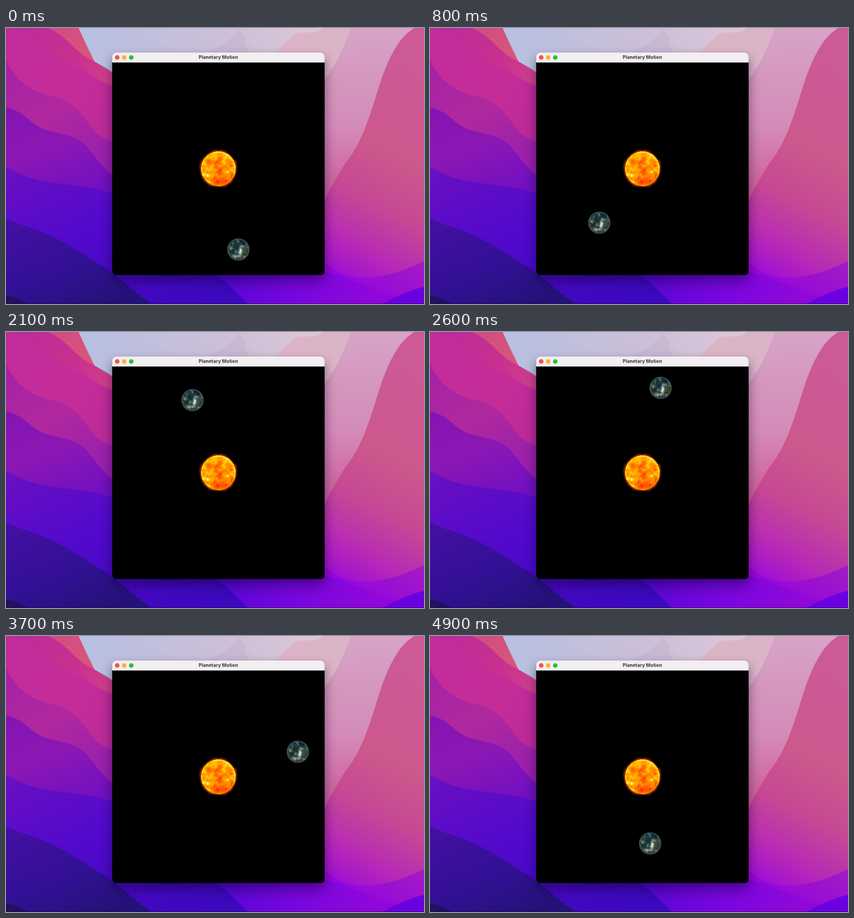
Recreate the animation shown at these times as an HTML page with a canvas. Size 921 by 608 pixels, loop 5 s.

```html
<!DOCTYPE html>
<html lang="en">
<head>
<meta charset="utf-8">
<title>Planetary Motion</title>
<style>
  html, body { margin: 0; width: 100%; height: 100%; overflow: hidden; background: #4a08c0; }
  #stage { position: absolute; left: 0; top: 0; width: 921px; height: 608px; overflow: hidden; }
  #stage > svg { position: absolute; left: 0; top: 0; }
  #win {
    position: absolute; left: 234px; top: 54px; width: 468px; height: 490px;
    border-radius: 8px; overflow: hidden; background: #000;
  }
  #shade {
    position: absolute; left: 234px; top: 54px; width: 468px; height: 490px; border-radius: 8px;
    box-shadow: 0 0 1px rgba(0,0,0,.6), 0 13px 26px rgba(10,0,40,.48);
  }
  #bar {
    height: 22px; background: #f2eef2; color: #3a373b; text-align: center;
    font: 700 10.4px/22px Inter, "Open Sans", sans-serif;
  }
  #bar i { position: absolute; top: 6.2px; width: 9.6px; height: 9.6px; border-radius: 50%; }
  canvas { position: absolute; left: 0; top: 0; }
</style>
</head>
<body>
<div id="stage">
  <svg width="921" height="608" viewBox="0 0 921 608">
    <defs>
      <linearGradient id="sky"><stop offset=".17" stop-color="#b6c0e2"/><stop offset=".5" stop-color="#cbbfd8"/><stop offset=".75" stop-color="#dcc6d8"/></linearGradient>
      <linearGradient id="peak" x1="0" y1="0" x2="1" y2="1"><stop offset="0" stop-color="#cf4a86"/><stop offset="1" stop-color="#e0606c"/></linearGradient>
      <linearGradient id="rose" x1="0" y1="0" x2="1" y2=".5"><stop offset="0" stop-color="#b52c9a"/><stop offset=".6" stop-color="#c9308f"/><stop offset="1" stop-color="#d24488"/></linearGradient>
      <linearGradient id="rose2" x1="0" y1="0" x2="1" y2=".7"><stop offset="0" stop-color="#c22c9a"/><stop offset=".6" stop-color="#c52d98"/><stop offset="1" stop-color="#bb2a9a"/></linearGradient>
      <linearGradient id="plum" x1="0" y1="0" x2=".5" y2="1"><stop offset="0" stop-color="#a422a8"/><stop offset=".5" stop-color="#b0289e"/><stop offset="1" stop-color="#9a20ac"/></linearGradient>
      <linearGradient id="violet" x1="0" y1="0" x2=".4" y2="1"><stop offset="0" stop-color="#8514b4"/><stop offset=".5" stop-color="#8c18b4"/><stop offset="1" stop-color="#7410c0"/></linearGradient>
      <linearGradient id="blue" x1="0" y1="0" x2=".8" y2="1"><stop offset="0" stop-color="#6a10c0"/><stop offset=".45" stop-color="#5209cc"/><stop offset="1" stop-color="#3c08bc"/></linearGradient>
      <linearGradient id="indigo" x1="0" y1="0" x2=".7" y2="1"><stop offset="0" stop-color="#4410a4"/><stop offset=".6" stop-color="#321094"/><stop offset="1" stop-color="#241278"/></linearGradient>
      <linearGradient id="haze" x1="0" y1="0" x2="0" y2="1"><stop offset="0" stop-color="#d6a4c6"/><stop offset=".35" stop-color="#d48cb8"/><stop offset=".62" stop-color="#cc5c98"/><stop offset=".85" stop-color="#b222c0"/><stop offset="1" stop-color="#8a08dc"/></linearGradient>
      <linearGradient id="ridge" x1=".2" y1="0" x2="0" y2="1"><stop offset="0" stop-color="#cc5a96"/><stop offset=".35" stop-color="#cc588c"/><stop offset=".55" stop-color="#c64894"/><stop offset=".72" stop-color="#b82cb4"/><stop offset=".87" stop-color="#a00cd6"/><stop offset="1" stop-color="#8004e0"/></linearGradient>
      <linearGradient id="base"><stop offset="0" stop-color="#5206d2"/><stop offset=".45" stop-color="#7a06de"/><stop offset="1" stop-color="#9a08d6"/></linearGradient>
    </defs>
    <rect width="921" height="608" fill="url(#sky)"/>
    <path d="M425 70C460 42 500 28 516 0L560 70Z" fill="#c9b4d0" opacity=".75"/>
    <path d="M516 0C540 30 570 45 600 52L590 70H540Z" fill="#d4c2d6" opacity=".7"/>
    <path d="M585 62C612 45 625 12 650 10C675 10 690 10 698 0H780V200H690V70Z" fill="#dcb4c8"/>
    <path d="M760 0C745 40 728 85 690 128V608H921V0Z" fill="url(#haze)"/>
    <path d="M921 0H900C866 18 842 68 824 122C804 186 786 250 752 292C730 322 716 355 690 400V608H921Z" fill="url(#ridge)"/>
    <path d="M690 512C712 520 722 538 768 548C815 556 868 538 921 514V608H690Z" fill="#8c06dc" opacity=".55"/>
    <path d="M440 538H708C735 542 758 556 790 566C840 584 880 594 900 608H440Z" fill="url(#base)"/>
    <path d="M828 608C855 592 890 578 921 570V608Z" fill="#6a00e0"/>

    <path d="M85 0H160C172 26 186 58 200 82L240 130H150Z" fill="url(#peak)"/>
    <path d="M0 0H92C132 16 146 46 178 64C200 78 220 86 240 102V300H0Z" fill="url(#rose)"/>
    <path d="M0 0C45 5 72 20 94 46C120 82 165 84 192 106C206 116 222 124 240 130V320H0Z" fill="url(#rose2)"/>
    <path d="M0 72C26 122 62 142 100 150C150 160 168 190 190 222C204 240 222 246 240 250V340H0Z" fill="url(#plum)"/>
    <path d="M0 175C45 184 54 216 92 226C140 238 162 236 192 278C208 300 222 316 240 328V380H0Z" fill="url(#violet)"/>
    <path d="M0 305C34 328 76 338 120 343C160 347 200 354 240 365V530H445C476 548 505 580 532 608H0Z" fill="url(#blue)"/>
    <path d="M0 419C34 436 76 444 112 464C160 490 208 520 244 548C270 568 294 590 322 608H0Z" fill="url(#indigo)"/>
    <path d="M0 588C20 592 34 598 48 608H0Z" fill="#241060"/>
    <rect y="607" width="921" height="1" fill="#180838" opacity=".7"/>
  </svg>
  <div id="shade"></div>
  <div id="win">
    <div id="bar"><i style="left:6.2px;background:#ff4f47"></i><i style="left:21.7px;background:#f7b32a"></i><i style="left:37.2px;background:#24c03d"></i>Planetary Motion</div>
  </div>
</div>
<script>
const win = document.getElementById('win');
const clamp = (v, lo = 0, hi = 1) => Math.min(hi, Math.max(lo, v));
const mix = (a, b, k) => a.map((v, i) => v + (b[i] - v) * k);

// Seeded value noise
const hash = (x, y) => {
  const s = Math.sin(x * 127.1 + y * 311.7) * 43758.5453;
  return s - Math.floor(s);
};
function noise(x, y) {
  const i = Math.floor(x), j = Math.floor(y);
  const ease = v => v * v * (3 - 2 * v);
  const u = ease(x - i), v = ease(y - j);
  const top = hash(i, j) * (1 - u) + hash(i + 1, j) * u;
  const low = hash(i, j + 1) * (1 - u) + hash(i + 1, j + 1) * u;
  return top * (1 - v) + low * v;
}
const cloud = (x, y, s) =>
  noise(x / s, y / s) * .5 + noise(x * 2 / s + 9, y * 2 / s) * .3 + noise(x * 4 / s, y * 4 / s + 5) * .2;
const spot = (x, y, cx, cy, w, h) => Math.exp(-(((x - cx) / w) ** 2) - ((y - cy) / h) ** 2);

function sprite(half, shade) {
  const c = document.createElement('canvas'), size = half * 2;
  c.width = c.height = size;
  const g = c.getContext('2d'), img = g.createImageData(size, size);
  for (let p = 0; p < size * size; p++) {
    const x = p % size - half + .5, y = Math.floor(p / size) - half + .5;
    const [rgb, a] = shade(x, y, Math.hypot(x, y));
    img.data.set([...rgb, a * 255], p * 4);
  }
  g.putImageData(img, 0, 0);
  win.append(c);
  return c;
}

function sunShade(x, y, d) {
  const R = 38;
  if (d > R) {
    const flare = 1.6 + 2.6 * noise(Math.atan2(y, x) * 5 + 40, 3);
    return [[225, 75, 0], .75 * Math.exp(-(((d - R) / flare) ** 2))];
  }
  const hot = spot(x, y, -22, 16, 11, 4) + .8 * spot(x, y, 6, 20, 9, 3) + .8 * spot(x, y, 20, 10, 5, 8)
    + .7 * spot(x, y, 28, -7, 6, 4) + .8 * spot(x, y, -31, -6, 4, 9) + .5 * spot(x, y, -12, 27, 9, 3);
  const n = cloud(x + 60, y + 60, 9) - .5;
  const rim = (d / R) ** 9 * .32;
  const h = .53 + n * .75 - y * .0035 + rim + hot * (.25 + n * 1.3)
    - .16 * spot(x, y, 6, 0, 14, 9) - .1 * spot(x, y, 5, 30, 18, 6);
  return [[255, 255 * clamp(h, .2, .98), 255 * clamp((h - .78) * 1.9, 0, .8)], 1];
}

function earthShade(x, y, d) {
  const R = 23.4;
  const land = clamp((cloud(x + 33, y + 71, 11) - .43) * 6);
  const n = cloud(x + 90, y + 20, 6);
  let c = mix([18, 47, 56], [68, 82, 55], land * .85);
  c = mix(c, [15, 48, 60], .65 * spot(x, y, 1, -11, 9, 5));
  const white = clamp((n - .55) * 2.6) * .75 + .95 * spot(x, y, 4.5, 4, 3, 9)
    + .45 * spot(x, y, 10, -7, 5, 3) + .35 * spot(x, y, -6, 15, 8, 3);
  c = mix(c, [218, 226, 222], clamp(white, 0, .95));
  c = c.map(v => v * (1.02 - .35 * (d / R) ** 3));
  c = mix(c, [72, 116, 124], .8 * Math.exp(-(((d - R) / 1.3) ** 2)));
  return [c, d < R ? 1 : .75 * Math.exp(-(((d - R) / 1.5) ** 2))];
}

const place = (c, x, y) => {
  c.style.transform = `translate(${Math.round(x - c.width / 2)}px,${Math.round(y - c.height / 2)}px)`;
};
const hub = { x: 234, y: 256 };
place(sprite(46, sunShade), hub.x, hub.y);
const earth = sprite(28, earthShade);

// time s, radius, radial speed, angle rad, angular speed
const orbit = [
  [0, 183.4, -27, 1.328, .98],
  [.8, 152.3, -42, 2.245, 1.51],
  [1.3, 140.1, 2, 3.098, 1.83],
  [2.1, 169.8, 51, 4.370, 1.25],
  [3.1, 198.3, -6, 5.395, .93],
  [4.3, 157.9, -42, 6.735, 1.50],
  [4.9, 148, 16, 7.739, 1.735]
];
function hermite(a, b, va, vb, h, u) {
  const w = 1 - u;
  return w * w * (1 + 2 * u) * a + u * u * (3 - 2 * u) * b + h * u * w * (w * va - u * vb);
}
const LOOP = 5000, STEP = 100;
function draw(ms) {
  const t = Math.floor(ms % LOOP / STEP) * STEP / 1000;
  let i = 0;
  while (i < orbit.length - 2 && t >= orbit[i + 1][0]) i++;
  const a = orbit[i], b = orbit[i + 1], h = b[0] - a[0], u = (t - a[0]) / h;
  const r = hermite(a[1], b[1], a[2], b[2], h, u);
  const q = hermite(a[3], b[3], a[4], b[4], h, u);
  place(earth, hub.x + r * Math.cos(q), hub.y + r * Math.sin(q));
}
const start = performance.now();
function tick() {
  draw(performance.now() - start);
  requestAnimationFrame(tick);
}
draw(0);
requestAnimationFrame(tick);
</script>
</body>
</html>
```
